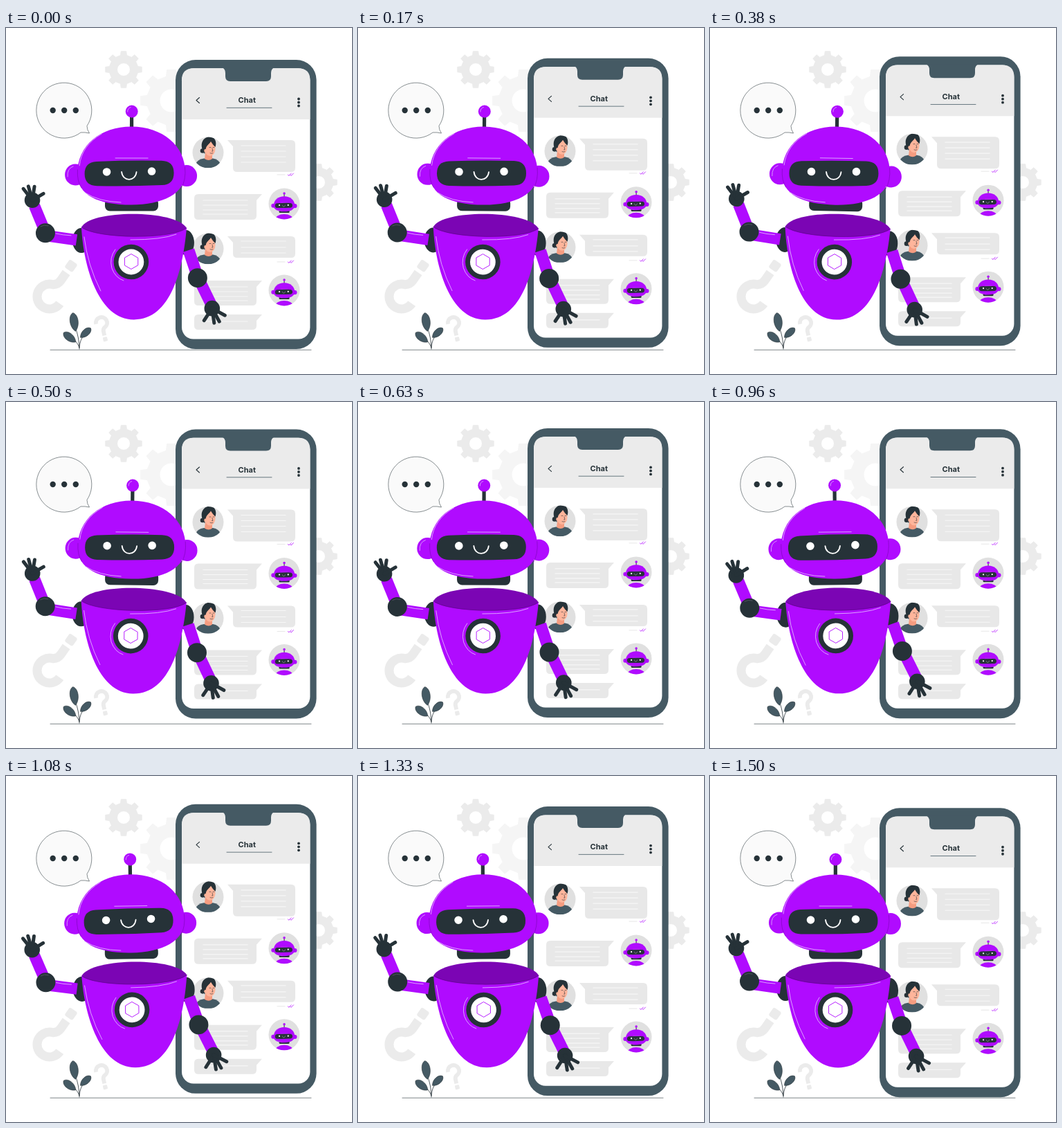
These frames come from a looping animation (500x500 px, 1540 ms). An HTML page:

```html
<!DOCTYPE html>
<html lang="en">
<head>
<meta charset="utf-8">
<title>Chat robot</title>
<style>
html, body { margin: 0; width: 100%; height: 100%; overflow: hidden; background: #fff; }
svg { display: block; width: 100vw; height: 100vh; }
text { font: 700 11px Inter, sans-serif; }
</style>
</head>
<body>
<svg id="stage" viewBox="0 0 500 500"></svg>
<script>
const PURPLE = '#b00bff', DEEP = '#7b05b4', INK = '#263238', SLATE = '#455a64', GREY = '#ebebeb', SHINE = '#e0b0ff';
const LOOP = 1540, STEPS = 37;

const circle = (x, y, r, fill, more = '') =>
  `<circle cx="${x}" cy="${y}" r="${r}" fill="${fill}" ${more}/>`;
const ellipse = (x, y, rx, ry, fill) =>
  `<ellipse cx="${x}" cy="${y}" rx="${rx}" ry="${ry}" fill="${fill}"/>`;
const rect = (x, y, w, h, r, fill) =>
  `<rect x="${x}" y="${y}" width="${w}" height="${h}" rx="${r}" fill="${fill}"/>`;
const shape = (d, fill, more = '') => `<path d="${d}" fill="${fill}" ${more}/>`;
const line = (d, color, width = 1, cap = 'round') =>
  `<path d="${d}" fill="none" stroke="${color}" stroke-width="${width}" stroke-linecap="${cap}" stroke-linejoin="round"/>`;

function gear(x, y, R, hole, fill) {
  const pts = [], n = 8, r = R * 0.79;
  for (let i = 0; i < n; i++) {
    for (const [off, rad] of [[-0.27, r], [-0.18, R], [0.18, R], [0.27, r]]) {
      const a = (i + off) * 2 * Math.PI / n;
      pts.push((x + rad * Math.cos(a)).toFixed(1) + ' ' + (y + rad * Math.sin(a)).toFixed(1));
    }
  }
  const ring = `M${x - hole} ${y}a${hole} ${hole} 0 1 0 ${2 * hole} 0a${hole} ${hole} 0 1 0 ${-2 * hole} 0Z`;
  return shape(`M${pts.join('L')}Z${ring}`, fill, `fill-rule="evenodd" stroke="${fill}" stroke-linejoin="round"`);
}

const question = (x, y, turn, scale) =>
  `<g transform="translate(${x} ${y}) rotate(${turn}) scale(${scale})">
    ${line('M-18 0A18 18 0 1 1 7 16.5Q0 20 0 29V42', GREY, 13, 'butt')}${rect(-7, 47, 14, 14, 3, GREY)}</g>`;

function leaf(x, y, rx, ry, turn) {
  const d = `M0 ${ry}C${-rx * 1.4} ${ry * 0.4} ${-rx * 1.2} ${-ry * 0.8} 0 ${-ry}C${rx * 1.2} ${-ry * 0.8} ${rx * 1.4} ${ry * 0.4} 0 ${ry}Z`;
  return `<g transform="translate(${x} ${y}) rotate(${turn})">${shape(d, SLATE, `stroke="${INK}" stroke-width=".6"`)}</g>`;
}

function backdrop() {
  const talk = 'M117 141.5A40 40 0 1 0 108 151Q114 150.5 120.5 152Q117 147 117 141.5Z';
  return gear(239, 105, 45, 17, '#f5f5f5') + gear(170, 60, 26.5, 9.5, GREY) + gear(452, 223, 26.5, 9.5, GREY) +
    question(63, 388, 215, 1) + question(138, 426, -13, 0.45) +
    line('M64 465.2H441', INK, 0.6) +
    line('M106 464Q106 448 100 432M106 462Q103 453 96 449M106 462Q107 450 112 445', INK, 0.8) +
    leaf(98.5, 425, 6, 13.5, -8) + leaf(92, 447, 5.5, 11, -52) + leaf(115, 440.5, 5, 10, 48) +
    shape(talk, '#fafafa', `stroke="${INK}" stroke-width=".55"`) +
    [67.7, 84.2, 100.8].map(x => circle(x, 119, 4.2, INK)).join('');
}

// side -1 puts the tail at the left corner, 1 at the right
function message(side, y, h, rows) {
  const flip = side < 0 ? '' : ' transform="translate(690 0) scale(-1 1)"';
  const d = `M320 ${y}H412q6 0 6 6V${y + h - 6}q0 6 -6 6H334q-6 0 -6 -6V${y + 9}Z`;
  const left = side < 0 ? 340 : 285;
  return `<g${flip}>${shape(d, '#e8e8e8')}</g>` +
    rows.map(v => line(`M${left} ${v}h64`, '#f7f7f7', 1.1)).join('');
}

const ticks = y =>
  line(`M392 ${y}h11`, '#d5d5d5', 0.6) +
  line(`M407.5 ${y}l1.300 1.500l3.500 -3.500M411 ${y + 0.5}l1 1l3.500 -3.500`, PURPLE, 0.8);

function woman(y) {
  return `<g transform="translate(292 ${y})">${circle(0, 0, 22.5, '#e0e0e0')}
    <g clip-path="url(#disc)">
      ${shape('M-18 22V17Q-16 10 -6 8.5L7 8.5Q16 10 18 17V22Z', SLATE)}
      ${shape('M-4 0H6V9Q1 13 -5 9Z', '#f59c80')}
      ${ellipse(2.8, -5.5, 7.8, 10.5, '#ffb59b')}
      ${shape('M-7 -2C-12 -10 -9 -22 2 -23C10 -23.500 13 -15 10.500 -8C8 -10 6 -13 4 -16C1 -11 -3 -11 -3.500 -3L-5 2Z', INK)}
      ${circle(-8, -2.5, 3.3, INK)}${ellipse(-4, -2.5, 1.7, 2.4, '#ffb59b')}
      ${line('M2 -7.500h2M7 -7.500h2M6 -6l1 4h-1.500M3 .800q2 1.200 4 0', INK, 0.6)}
    </g></g>`;
}

const bot = y =>
  `<g transform="translate(402 ${y})">${circle(0, 0, 22.5, '#e0e0e0')}
    <g clip-path="url(#disc)">${ellipse(0, 23, 13, 8, PURPLE)}
    <use href="#head" transform="translate(-35.300 -38.500) scale(.195)"/></g></g>`;

function phone() {
  return rect(245, 46, 203.6, 418, 29, SLATE) + rect(254, 58.3, 185.4, 391.3, 17, '#fff') +
    shape('M254 132V75.3Q254 58.3 271 58.3H422.4Q439.400 58.3 439.400 75.3V132Z', GREY) +
    shape('M312 57Q317 59 317 65V70Q317 77 324 77H376Q383 77 383 70V65Q383 59 388 57Z', SLATE) +
    line('M279.5 100.5L275 104.5L279.5 108.5', INK, 1.1) +
    `<text x="348.3" y="108" text-anchor="middle" fill="${INK}">Chat</text>` +
    line('M319 115.3H384', SLATE, 0.8) +
    [102.5, 107.5, 112.5].map(y => circle(423, y, 1.9, INK)).join('') +
    woman(180) + message(-1, 162, 46, [170, 178, 186, 194]) + ticks(212) +
    bot(254) + message(1, 240, 37, [249, 256, 263, 269]) +
    woman(319) + message(-1, 301, 31, [308, 317, 325]) + ticks(338) +
    bot(379) + message(1, 365, 36, [374, 381, 388, 394]) +
    message(1, 414, 22, [424]);
}

function head() {
  return `<g id="head">
    ${rect(178.8, 126, 5.2, 20, 0, INK)}
    ${circle(181.5, 120.5, 9, PURPLE)}${line('M175.500 121A6.500 6.500 0 0 1 180 114.500', SHINE, 0.8)}
    ${rect(143, 246, 77, 18.5, 7, INK)}
    ${ellipse(100, 212, 15, 15.5, PURPLE)}${ellipse(261, 213.5, 15, 15.5, PURPLE)}
    ${line('M89 215Q88 203 97 200', SHINE, 0.8)}
    ${shape('M103 210.5C103 169 137 142.4 181 142.4C226 142.4 259 170 259 208.500C259 240 226 255.500 181 255.500C134 255.500 103 242 103 210.5Z', PURPLE)}
    ${line('M103.300 205Q102.500 222 109 231M258.500 201Q260.500 219 253 232', DEEP, 0.6)}
    ${line('M106 199Q109 170 138 153M114 238Q134 251 166 252M158 188H205', SHINE, 0.9)}
    <g transform="rotate(-.8 178 210)">
      ${shape('M131 192.300Q178 190.800 225 192.300Q242.500 193 242.500 210Q242.500 227 225 227.700Q178 229.200 131 227.700Q113.500 227 113.500 210Q113.500 193 131 192.300Z', INK)}
    </g>
    ${circle(145.5, 208, 5.8, '#fff')}${circle(210.5, 207, 5.8, '#fff')}
    ${line('M167 208C168.500 222.500 187 222.500 188.500 208', '#fff', 1.8)}
  </g>`;
}

const hand = (x, y, tips) =>
  circle(x, y, 11.3, INK) + tips.map(([a, b]) => line(`M${x} ${y}L${a} ${b}`, INK, 5)).join('');

function arms() {
  return ellipse(109, 307, 13, 18, INK) +
    line('M60 300.5L102 306.500', PURPLE, 16.5, 'butt') + line('M72 297Q82 299.500 94 300', SHINE, 0.9) +
    line('M55.500 292L41 257', PURPLE, 16.5, 'butt') + circle(57, 296.5, 14, INK) +
    line('M50 287Q55 284 61 286', '#5c666b', 0.7) +
    hand(38, 249, [[25, 232.5], [32.3, 229], [41, 229.5], [54, 239.5]]) +
    ellipse(260, 310, 12, 18, INK) +
    line('M264 321L277.500 361', PURPLE, 17, 'butt') +
    line('M278 361L297 400', PURPLE, 16.5, 'butt') + circle(277, 361, 14, INK) +
    hand(298, 405, [[286.5, 422.5], [301, 426], [308.5, 424], [316.5, 415]]);
}

function torso() {
  const hex = [0, 1, 2, 3, 4, 5].map(i => {
    const a = (i + 0.5) * Math.PI / 3;
    return `${(181 + 11 * Math.cos(a)).toFixed(1)} ${(337.5 + 11 * Math.sin(a)).toFixed(1)}`;
  }).join('L');
  return shape('M109 288C112 345 134 421.4 185 421.4C239 421.4 256 348 261 289Z', PURPLE) +
    shape('M109 288C122 262 246 262 261 289C240 306 130 305 109 288Z', DEEP) +
    line('M109 288C130 305 240 306 261 289', '#5d0389', 0.7) +
    line('M113 302Q118 343 137 380M180 306Q225 306 246 298', SHINE, 0.9) +
    line('M158 320Q149 332 153 347Q158 361 170 365', SHINE, 0.9) +
    circle(181, 338, 25.3, INK) + circle(181, 338, 18.4, '#fff') + line(`M${hex}Z`, PURPLE, 0.9);
}

document.getElementById('stage').innerHTML =
  `<defs><clipPath id="disc"><circle r="22.5"/></clipPath></defs>
  ${backdrop()}<g id="phone">${phone()}</g><g id="robot">${arms()}${torso()}${head()}</g>`;

const phoneEl = document.getElementById('phone');
const robotEl = document.getElementById('robot');

function draw(ms) {
  const tick = LOOP / STEPS;
  const t = Math.floor((ms % LOOP) / tick + 0.2) * tick;
  const p = ((t + 30) / LOOP) % 1;
  const lift = 1 - Math.abs(1 - 2 * p);
  const sway = Math.abs(((p + 0.25) % 1) * 4 - 2);
  phoneEl.setAttribute('transform', `translate(0 ${(0.4 - 10 * lift).toFixed(3)})`);
  robotEl.setAttribute('transform', `rotate(${(1 - sway).toFixed(4)} 173 267)`);
}

const start = performance.now();
function loop() {
  draw(performance.now() - start);
  requestAnimationFrame(loop);
}
loop();
</script>
</body>
</html>
```
